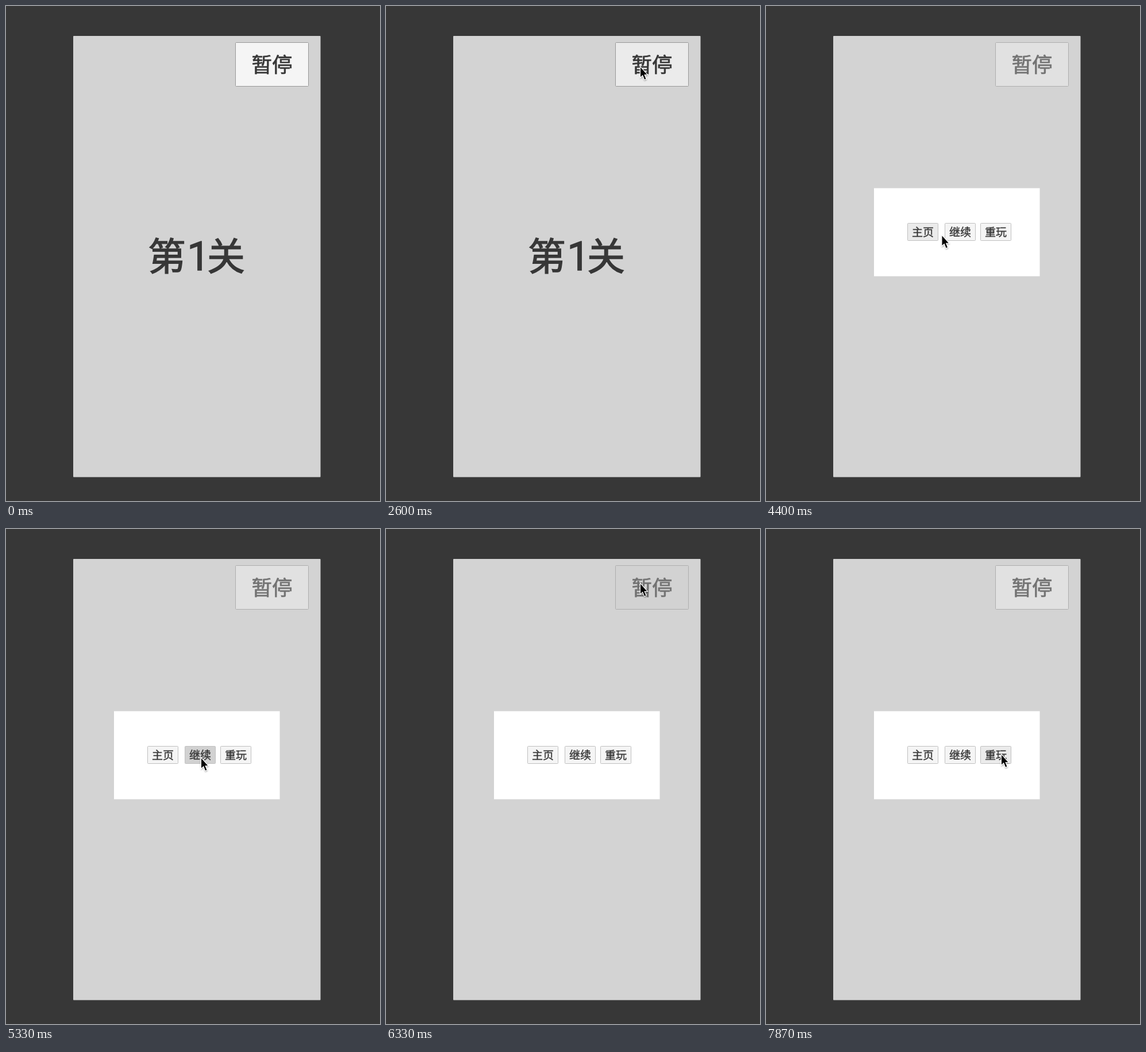
These frames come from a looping animation (651 by 860 pixels, 8 s). An HTML page:

```html
<!DOCTYPE html>
<html lang="zh">
<head>
<meta charset="utf-8">
<style>
html, body { margin: 0; width: 100%; height: 100%; overflow: hidden; background: #373737; }
svg { display: block; width: 651px; height: 860px; }
text {
  font-family: "Noto Sans CJK SC", "Noto Sans CJK", sans-serif;
  fill: #373737; stroke: #373737; stroke-width: 0.02em; text-anchor: middle;
}
.digit { font-family: Roboto, sans-serif; }
</style>
</head>
<body>
<svg viewBox="0 0 651 860">
  <defs>
    <filter id="soft" x="-50%" y="-50%" width="200%" height="200%">
      <feDropShadow dx="0.3" dy="1.5" stdDeviation="1" flood-color="#000" flood-opacity="0.35"/>
    </filter>
  </defs>
  <rect width="651" height="860" fill="#373737"/>
  <rect x="117" y="52" width="430.5" height="766.5" rx="1" fill="#d3d3d3"/>
  <g id="title" font-size="66">
    <text x="280" y="459">第</text>
    <text class="digit" x="335" y="459" font-size="70">1</text>
    <text x="383" y="459">关</text>
  </g>
  <g id="page"></g>
  <g id="dialog">
    <rect x="188" y="316.5" width="288.5" height="153" fill="#fff"/>
  </g>
  <g id="cursor" filter="url(#soft)">
    <path d="M1 1.4V18.2L4.9 14.7L8 22.4L10.4 21.4L7.3 13.9H12.2Z" fill="#000" stroke="#fff" stroke-width="2.2" paint-order="stroke"/>
  </g>
</svg>
<script>
const LOOP = 8000, STEP = 200 / 3, HOVER_LAG = 100;
const get = id => document.getElementById(id);
const title = get('title'), page = get('page'), dialog = get('dialog'), cursor = get('cursor');

function add(parent, tag, attrs) {
  const el = document.createElementNS('http://www.w3.org/2000/svg', tag);
  for (const key in attrs) el.setAttribute(key, attrs[key]);
  return parent.appendChild(el);
}

function button(parent, label, size, stroke, x, y, width, height) {
  const face = add(parent, 'rect', { x, y, width, height, rx: 1, stroke });
  add(parent, 'text', { x: x + width / 2, y: y + height / 2 + size * 0.37, 'font-size': size }).textContent = label;
  return { face, hit: (px, py) => px >= x && px <= x + width && py >= y && py <= y + height };
}
const pause = button(page, '暂停', 35.5, '#989898', 399.5, 63.5, 127, 76);
const menu = [['主页', 246.5], ['继续', 311.5], ['重玩', 373.5]]
  .map(([label, x]) => button(dialog, label, 19, '#c0c0c0', x, 377.5, 53, 30));

// Pointer moves, each starting where the last one ended
const moves = [
  { from: 530, to: 730, x: 297, y: 448 },
  { from: 800, to: 1330, x: 442, y: 105 },
  { from: 3200, to: 4070, x: 262, y: 399 },
  { from: 4200, to: 4930, x: 339, y: 397 },
  { from: 5600, to: 5930, x: 436, y: 175 },
  { from: 5930, to: 6300, x: 442, y: 94 },
  { from: 6670, to: 7330, x: 433, y: 396 },
  { from: 7400, to: 7870, x: 409, y: 391 }
];
// Each release opens or closes the dialog
const clicks = [{ down: 2800, up: 2860 }, { down: 5200, up: 5400 }, { down: 6260, up: 6330 }];

const clamp = u => Math.min(1, Math.max(0, u));
const mix = (a, b, u) => a + (b - a) * u;
const easeOut = u => 1 - Math.pow(1 - u, 2.6);

function pointer(t) {
  let x = 411, y = 331;
  for (const m of moves) {
    const u = easeOut(clamp((t - m.from) / (m.to - m.from)));
    x = mix(x, m.x, u);
    y = mix(y, m.y, u);
  }
  return [x, y];
}

function paint(btn, grey) {
  const v = Math.round(grey);
  btn.face.setAttribute('fill', `rgb(${v},${v},${v})`);
}

function draw(ms) {
  const t = Math.floor((ms % LOOP + 5) / STEP) * STEP;
  const done = clicks.filter(c => t >= c.up);
  const open = done.length % 2 === 1;
  const pressed = clicks.some(c => t >= c.down && t < c.up);
  const spot = pointer(t - HOVER_LAG);
  const grey = btn => !btn.hit(...spot) ? 245 : pressed ? 209 : 235;

  title.setAttribute('visibility', open ? 'hidden' : 'visible');
  dialog.setAttribute('visibility', open ? 'visible' : 'hidden');
  page.setAttribute('opacity', open ? 0.61 : 1);
  paint(pause, open ? mix(209, 234, clamp((t - done[done.length - 1].up) / 140)) : grey(pause));
  menu.forEach(btn => paint(btn, grey(btn)));

  const [x, y] = pointer(t);
  const shown = t >= 530 && t < 1460 || t >= 2460;
  cursor.setAttribute('visibility', shown ? 'visible' : 'hidden');
  cursor.setAttribute('transform', `translate(${x} ${y})`);
}

const start = performance.now();
function tick() {
  draw(performance.now() - start);
  requestAnimationFrame(tick);
}
draw(0);
requestAnimationFrame(tick);
</script>
</body>
</html>
```
